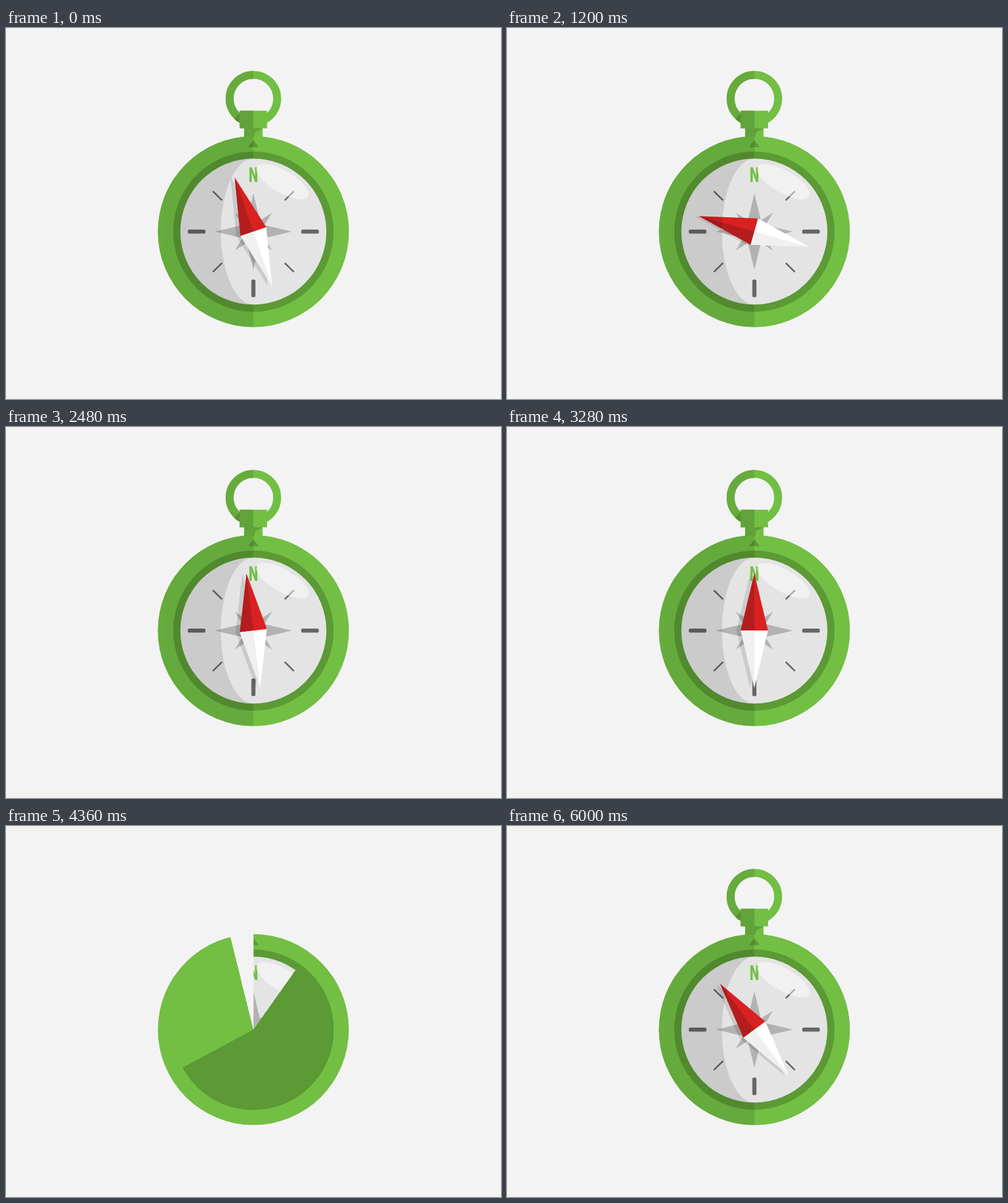
An HTML page that plays this animation: 800x600 px, repeating every 6040 ms.

```html
<!DOCTYPE html>
<html lang="en">
<head>
<meta charset="utf-8">
<title>Compass</title>
<style>
  @property --sweep { syntax: "<angle>"; inherits: false; initial-value: 0deg; }

  html, body { margin: 0; width: 100%; height: 100%; overflow: hidden; background: #f3f3f3; }
  svg { position: absolute; left: 0; top: 0; width: 800px; height: 600px; }

  /* The cycle starts with the empty stage; the page opens 2680 ms into it. */
  .rim, .well, .dial, .crown, .needle {
    animation: 6040ms -2680ms infinite linear;
  }

  .rim, .well, .dial {
    -webkit-mask-image: conic-gradient(at 399.8px 329.3px, #000 var(--sweep), #0000 0);
    mask-image: conic-gradient(at 399.8px 329.3px, #000 var(--sweep), #0000 0);
    animation-timing-function: cubic-bezier(.75, 0, .25, 1);
  }
  .rim { animation-name: sweep-rim; }
  .well { animation-name: sweep-well; }
  .dial { animation-name: sweep-dial; }
  @keyframes sweep-rim { 0% { --sweep: 0deg; } 21.192%, 100% { --sweep: 360deg; } }
  @keyframes sweep-well { 0%, 4.967% { --sweep: 0deg; } 26.159%, 100% { --sweep: 360deg; } }
  @keyframes sweep-dial { 0%, 9.934% { --sweep: 0deg; } 31.126%, 100% { --sweep: 360deg; } }

  .crown { transform-origin: 399.8px 176px; animation-name: pop; }
  @keyframes pop {
    0%, 19.868% { transform: scale(0); }
    23.841% { transform: scale(1); animation-timing-function: cubic-bezier(.61, 1, .88, 1); }
    25% { transform: scale(1.151); animation-timing-function: cubic-bezier(.12, 0, .39, 0); }
    26.606% { transform: scale(1); animation-timing-function: cubic-bezier(.61, 1, .88, 1); }
    27.748% { transform: scale(.934); animation-timing-function: ease-in-out; }
    30.513% { transform: scale(1.028); animation-timing-function: ease-in-out; }
    33.278% { transform: scale(.988); animation-timing-function: ease-in-out; }
    36.026% { transform: scale(1.005); animation-timing-function: ease-in-out; }
    38.79% { transform: scale(.998); animation-timing-function: ease-in-out; }
    43%, 100% { transform: scale(1); }
  }

  .needle {
    animation-name: grow, swing;
    animation-timing-function: linear, cubic-bezier(.333, 0, .667, 1);
  }
  @keyframes grow { 0%, 36.093% { scale: 0; } 40.066%, 100% { scale: 1; } }
  @keyframes swing {
    0%, 37.086% { rotate: 0deg; }
    41.854% { rotate: -63deg; }
    48.311% { rotate: 66deg; }
    51.656% { rotate: 46deg; }
    54.967% { rotate: 66deg; }
    65.232% { rotate: -78deg; }
    77.566% { rotate: 16deg; }
    84.934% { rotate: -7deg; }
    91.556% { rotate: 2deg; }
    98.3%, 100% { rotate: 0deg; }
  }
</style>
</head>
<body>
<svg class="rim" viewBox="0 0 800 600"><circle cx="399.8" cy="329.3" r="154.3" fill="#72bf44"/></svg>

<svg class="well" viewBox="0 0 800 600"><circle cx="399.8" cy="329.3" r="130" fill="#5b9a35"/></svg>

<svg class="dial" viewBox="0 0 800 600">
  <g transform="translate(399.8 329.3)">
    <circle r="154.3" fill="#72bf44"/>
    <circle r="129.6" fill="#5b9a35"/>
    <circle r="118" fill="#e4e4e4"/>
    <path d="M0-147.5L8.7-136.5H-8.7Z" fill="#5b9a35"/>

    <g fill="#666">
      <rect x="-106" y="-3.3" width="28.5" height="6.6" rx="2.6"/>
      <rect x="77.3" y="-3.3" width="28.5" height="6.6" rx="2.6"/>
      <rect x="-3.3" y="77.5" width="6.6" height="28.5" rx="2.6"/>
    </g>
    <path d="M-65.5-65.3L-50.7-50.7M65.5-65.3L50.7-50.7M-65.5 65.3L-50.7 50.7M65.5 65.3L50.7 50.7"
      stroke="#666" stroke-width="2.6"/>
    <path d="M-6.4-80.3V-104H-2.5L2.7-89.5V-104H6.4V-80.3H2.8L-2.7-95.5V-80.3Z" fill="#72bf44"/>
    <path d="M0-62L10.5-18L30-30.5L18-10.5L62 0L18 10.5L30 30.5L10.5 18L0 62L-10.5 18L-30 30.5L-18 10.5L-62 0L-18-10.5L-30-30.5L-10.5-18Z"
      fill="#b2b2b2"/>

    <g transform="translate(-7)" opacity=".11">
      <path class="needle" d="M0-92.5L22 0L0 92.5L-22 0Z"/>
    </g>
    <g class="needle">
      <path d="M0-92.5L22 0H-22Z" fill="#d92121"/>
      <path d="M0-92.5V0H-22Z" fill="#b41d1d"/>
      <path d="M0 92.5L22 0H-22Z" fill="#fff"/>
      <path d="M0 92.5V0H-22Z" fill="#f0f0f0"/>
    </g>

    <ellipse rx="48" ry="18" transform="translate(47 -80.8) rotate(30)" fill="#fff" opacity=".47"/>
    <g opacity=".1">
      <path d="M0-154.3A154.3 154.3 0 0 0 0 154.3V118A118 118 0 0 1 0-118Z"/>
      <path d="M0-118A118 118 0 0 0 0 118A52.5 118 0 0 1 0-118Z"/>
    </g>
  </g>
</svg>

<svg class="crown" viewBox="0 0 800 600">
  <g fill="none" stroke-width="12.8">
    <circle cx="399.8" cy="114.2" r="38.4" stroke="#72bf44"/>
    <path d="M399.8 75.8A38.4 38.4 0 0 0 399.8 152.6" stroke="#67ab3d"/>
  </g>
  <path d="M378 137L369 147Q373 151.5 378 153.5Z" fill="#569033"/>
  <path d="M377.7 133.8H421.9V162.3H414.7V176H384.9V162.3H377.7Z" fill="#72bf44"/>
  <path d="M377.7 133.8H399.8V176H384.9V162.3H377.7Z" fill="#61a23a"/>
  <path d="M399.8 162.3H414.7L402.5 168.5L401 176H399.8Z" fill="#5f9f39"/>
</svg>
</body>
</html>
```
